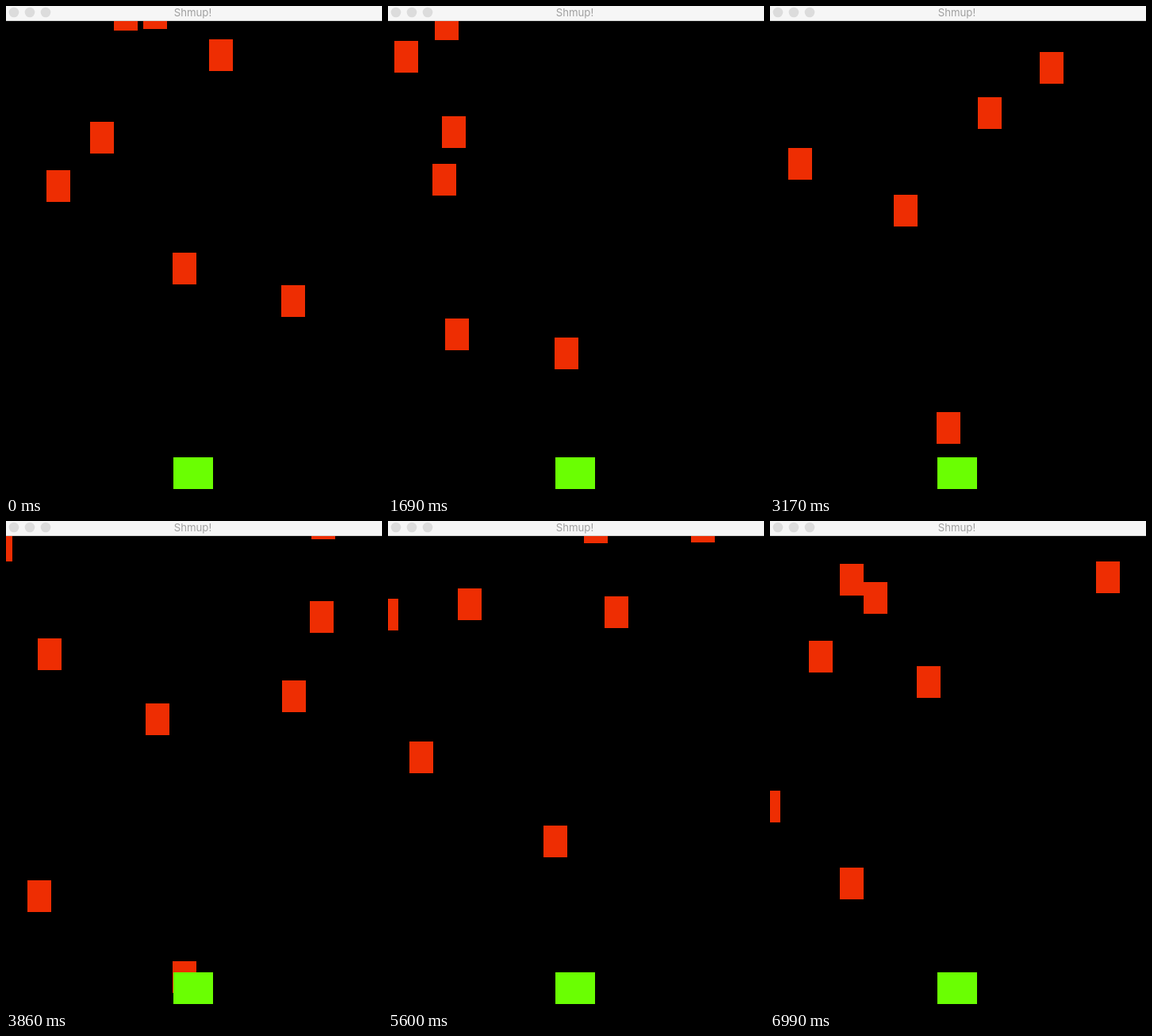
Write an HTML page with a canvas that moves like this. It is 474 px wide and 614 px high and loops after 7.09 s.

```html
<!DOCTYPE html>
<html lang="en">
<head>
<meta charset="utf-8">
<title>Shmup!</title>
<style>
  html, body { margin: 0; width: 474px; height: 614px; overflow: hidden; background: #000; }
  canvas { display: block; }
</style>
</head>
<body>
<canvas id="stage" width="474" height="614"></canvas>
<script>
const ctx = document.getElementById('stage').getContext('2d');
const LOOP = 7090, REFRESH = 49, MOBS = 8;

// Key poses: the game tick at a time, and a point on the path of each new mob.
const poses = [
  { ms: 0, tick: 0, at: { 0: [210, 311], 1: [136, -9], 2: [256, 42], 3: [51, 207], 5: [347, 352], 6: [106, 146], 7: [173, -11] } },
  { ms: 1690, tick: 107, at: { 3: [59, 3], 4: [8, 44], 5: [56, 199], 6: [72, 394], 7: [68, 139] } },
  { ms: 3170, tick: 201, at: { 1: [340, 58], 2: [262, 115], 5: [-38, 60], 6: [156, 238], 7: [23, 179] } },
  { ms: 3860, tick: 244, at: { 3: [385, -17], 4: [-22, 11], 5: [176, 230], 7: [40, 148] } },
  { ms: 5010, tick: 316, at: { 4: [276, 224], 5: [107, -2], 6: [79, 274] } },
  { ms: 5600, tick: 356, at: { 0: [88, 85], 2: [382, -13], 7: [-17, 98] } },
  { ms: 6990, tick: 444, at: { 1: [411, 51], 2: [118, 77], 4: [88, 54], 5: [49, 151], 6: [-17, 340], 7: [-32, 200] } }
];

const clamp = (v, lo, hi) => Math.min(hi, Math.max(lo, v));
const gone = ([x, y]) => y > 629 || x < -29 || x > 466;

// A mob keeps its vx for good. Once gone it respawns just above the field,
// falling at the whole speed that leads through its next key point.
function livesOf(id) {
  const vx = id < 3 ? id : -(id >> 1);
  const lives = [];
  let born = 0;
  for (const { tick, at } of poses) {
    if (!at[id]) continue;
    const [x, y] = at[id];
    const vy = tick ? clamp(Math.round((y + 50) / (tick - born)), 1, 7) : 1 + id * 5 % 7;
    const place = n => [x + vx * (n - tick), y + vy * (n - tick)];
    let end = born;
    while (!gone(place(end))) end++;
    lives.push({ born, end, place });
    born = end;
  }
  return lives;
}

const lives = Array.from({ length: MOBS }, (_, id) => livesOf(id)).flat();

// Ticks run evenly between poses but only show at each screen refresh.
function tickAt(ms) {
  const i = poses.findIndex(pose => pose.ms > ms);
  if (i < 0) return poses.at(-1).tick;
  const a = poses[i - 1], b = poses[i];
  const steps = Math.round((b.ms - a.ms) / REFRESH);
  const done = Math.floor((ms - a.ms) / (b.ms - a.ms) * steps) / steps;
  return Math.round(a.tick + (b.tick - a.tick) * done);
}

function box(color, x, y, w, h) {
  ctx.fillStyle = color;
  ctx.fillRect(x, y, w, h);
}

function titleBar() {
  box('#f6f6f6', 0, 0, 474, 18);
  box('#d2d4d2', 0, 18, 474, 1);
  ctx.fillStyle = '#dcdcdc';
  for (const x of [10, 30, 50]) {
    ctx.beginPath();
    ctx.arc(x, 8, 6.3, 0, 2 * Math.PI);
    ctx.fill();
  }
  ctx.fillStyle = '#a0a0a0';
  ctx.font = '13.2px Inter, "Liberation Sans", sans-serif';
  ctx.textAlign = 'center';
  ctx.fillText('Shmup!', 235.5, 13);
}

function draw(ms) {
  const n = tickAt(ms);
  box('#000', 0, 0, 474, 614);
  for (const { born, end, place } of lives) {
    if (n >= born && n < end) box('#ee2d02', ...place(n), 30, 40);
  }
  box('#6aff02', 211, 569, 50, 40);
  titleBar();
}

const start = performance.now();
function frame() {
  draw((performance.now() - start) % LOOP);
  requestAnimationFrame(frame);
}
frame();
</script>
</body>
</html>
```
